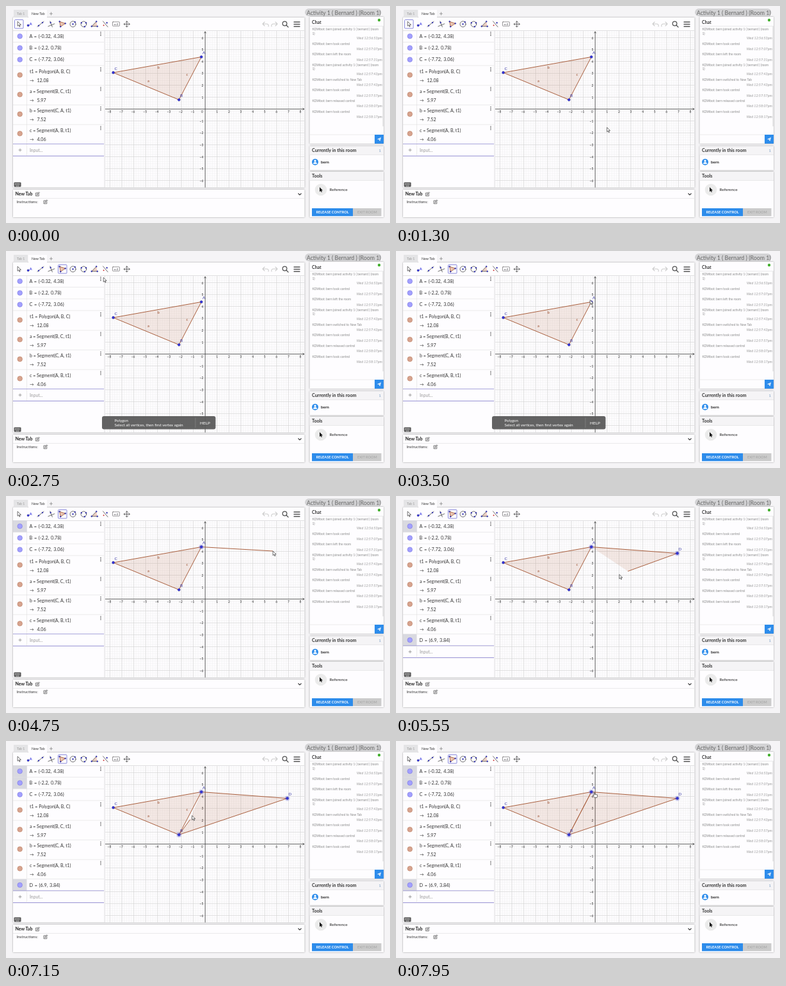
An HTML page for the animation above (8000 ms loop, 600 by 339 pixels).

```html
<!DOCTYPE html>
<html lang="en">
<head>
<meta charset="utf-8">
<title>Geometry room</title>
<style>
html, body { margin: 0; width: 100%; height: 100%; overflow: hidden; background: #f5f4f6; }
svg { display: block; width: 600px; height: 339px; font-family: Lato, "Open Sans", sans-serif; }
.card { fill: #fefdff; filter: drop-shadow(0 .7px .9px rgba(0,0,0,.4)); }
.head { fill: #f5f4f6; }
.rule { stroke: #ddd; stroke-width: .6; fill: none; }
.edge { stroke: #a95f3e; stroke-width: 1; fill: none; stroke-linejoin: round; }
.area { fill: #993300; fill-opacity: .1; }
.ink { stroke: #333; stroke-width: .7; fill: none; stroke-linecap: round; stroke-linejoin: round; }
.dot { fill: #3333e0; stroke: #22226a; stroke-width: .4; }
.halo { fill: #6666dd; fill-opacity: .35; }
.cell { fill: #d9d9e0; }
.b { font-weight: 700; }
.mid { text-anchor: middle; }
.end { text-anchor: end; }
.it { font-style: italic; }
.math { word-spacing: .8px; }
</style>
</head>
<body>
<svg viewBox="0 0 600 339">
  <defs>
    <clipPath id="view"><rect x="155" y="39" width="311.500" height="244.500"/></clipPath>
    <g id="edit" class="ink" style="stroke:#444">
      <path d="M1 -2H-2.500V2.800H2.300V0M-.6 1L-.3 -.4L2.500 -3.200L3.400 -2.300L.7 .5Z"/>
    </g>
  </defs>

  <!-- workspace -->
  <rect class="card" x="11" y="18" width="455.500" height="265.500"/>
  <rect x="12" y="6" width="22" height="12" fill="#e4e4e6"/>
  <rect x="35" y="6" width="29" height="12.500" fill="#fefdff"/>
  <path d="M68 12h5M70.500 9.500v5" stroke="#888" stroke-width=".8"/>
  <path class="rule" d="M11 38.500H466M154 38.500V283.500" style="stroke:#ccc"/>
  <rect id="picked" x="13.500" y="21.500" width="13.500" height="13.500" rx="1" fill="none" stroke="#7d7dd8" stroke-width=".9"/>
  <rect id="hover" x="81.500" y="21.500" width="13.500" height="13.500" rx="1" fill="#8888cc" fill-opacity=".18" stroke="#8c8cd8" stroke-width=".7"/>
  <g id="tools"></g>
  <g class="ink" style="stroke:#ccc;stroke-width:1.100">
    <path d="M404 25L401 28L404 31M401 28H407Q411 28 410 32"/>
    <path d="M421 25L424 28L421 31M424 28H418Q414 28 415 32"/>
  </g>
  <g class="ink" style="stroke:#555;stroke-width:1.300">
    <circle cx="435.500" cy="27.500" r="3.300"/>
    <path d="M438 30L441 33M450 25H459M450 28.500H459M450 32H459"/>
  </g>

  <g id="algebra"></g>
  <g id="inputRow">
    <path d="M11 215.500H153" stroke="#9a95d8" stroke-width=".8"/>
    <path d="M11 234.300H153" stroke="#8a83cf" stroke-width=".9"/>
    <path class="rule" d="M32.500 216V234"/>
    <path d="M19.500 225H24.500M22 222.500V227.500" stroke="#888" stroke-width=".8"/>
    <text x="37" y="227.800" font-size="6.800" fill="#999">Input...</text>
  </g>
  <g>
    <rect x="12.500" y="275.500" width="11" height="7" rx="1" fill="#555"/>
    <path d="M14 277.500H22M14 279.300H22M16 281.200H20" stroke="#fff" stroke-width=".8" stroke-dasharray="1 .6"/>
  </g>

  <!-- plot -->
  <g clip-path="url(#view)">
    <g id="grid"></g>
    <path class="edge" id="t1" style="fill:#930;fill-opacity:.1"/>
    <path id="fill" class="area"/>
    <path id="trace" class="edge"/>
    <g id="points"></g>
  </g>

  <g id="tip">
    <rect x="150" y="258" width="177.500" height="20.500" rx="3" fill="#5a5a5a" fill-opacity=".94"/>
    <path d="M296 260.500V276" stroke="#888" stroke-width=".7"/>
    <g fill="#fff" font-size="6.100">
      <text x="169.500" y="266.800">Polygon</text>
      <text x="169.500" y="274.300">Select all vertices, then first vertex again</text>
      <text x="303" y="271" font-size="6.500">HELP</text>
    </g>
  </g>

  <!-- instructions -->
  <rect class="card" x="11" y="287" width="455.500" height="43"/>
  <path class="rule" d="M11 300.500H466"/>
  <use href="#edit" x="49" y="294"/>
  <use href="#edit" x="61.500" y="306"/>
  <path class="ink" d="M456.800 293L459 295.200L461.200 293" style="stroke-width:1.100"/>

  <!-- sidebar -->
  <rect x="467" y="4" width="119.500" height="12" rx="6" fill="#d3d3d5"/>
  <rect class="card" x="474.500" y="17" width="115.500" height="198"/>
  <rect class="card" x="474.500" y="219" width="115.500" height="37.500"/>
  <rect class="card" x="474.500" y="259" width="115.500" height="71"/>
  <path class="head" d="M474.500 219H590V232.500H474.500ZM474.500 259H590V272.500H474.500Z"/>
  <path class="rule" d="M474.500 31.500H590M474.500 201H576M474.500 232.500H590M474.500 272.500H590"/>
  <rect x="588.300" y="32" width="1.400" height="156" fill="#e0e0e2"/>
  <circle cx="583" cy="22" r="2.200" fill="#43b02e"/>
  <rect x="576" y="201" width="14" height="14" fill="#2d8ceb"/>
  <path d="M580 208L586 205.300L584.300 211.200L582.800 209.200L585 206.600L582 208.800Z" fill="#fff"/>
  <circle cx="483" cy="243.700" r="5" fill="#2d8ceb"/>
  <path d="M480 246.800Q480 244 483 244T486 246.800Z" fill="#fff"/>
  <circle cx="483" cy="242" r="1.700" fill="#fff"/>
  <circle cx="492" cy="287" r="9.300" fill="#ebebeb"/>
  <path d="M490 283V290.200L491.700 288.700L492.800 291.100L493.900 290.600L492.800 288.200H495Z" fill="#111"/>
  <rect x="478" y="316" width="64" height="12.300" fill="#2d8ceb"/>
  <rect x="542" y="316" width="44.500" height="12.300" fill="#cbcbcb"/>
  <g id="labels"></g>

  <g id="cursor" fill="#fff" stroke="#333" stroke-width=".7" stroke-linejoin="round">
    <path id="arrow" d="M0 0V6.800L1.700 5.300L2.800 7.900L3.900 7.400L2.800 4.900H5Z"/>
    <path id="hand" d="M-.7 .4Q0 -.6 .7 .4V3L2 2.800L3.300 3.100L4.600 3.500Q5 6 3.900 8H.2Q-1 6 -2.400 4.400Q-2 3.300 -.7 4.600Z"/>
  </g>
</svg>
<script>
const LOOP = 8000, UNIT = 18.6, OX = 311.2, OY = 161;
const $ = id => document.getElementById(id);
const add = (id, html) => $(id).insertAdjacentHTML('beforeend', html);
const text = (x, y, s, size, fill = '#333', cls = '') =>
  `<text x="${x}" y="${y}" font-size="${size}" fill="${fill}" class="${cls}">${s}</text>`;
const plot = (x, y) => [OX + x * UNIT, OY - y * UNIT];
const path = (...pts) => 'M' + pts.map(p => p.join(' ')).join('L');

const A = plot(-0.32, 4.38), B = plot(-2.2, 0.78), C = plot(-7.72, 3.06), D = plot(6.9, 3.84);

// Toolbar icons, each centred on its own origin
const dots = (...pts) => pts.map(([x, y]) => `<circle class="dot" cx="${x}" cy="${y}" r="1"/>`).join('');
const ink = d => `<path class="ink" d="${d}"/>`;
const icons = [
  ink('M-2.2 -3.8V3L-.5 1.5L.8 4.2L1.8 3.7L.6 1.1H2.8Z'),
  '<circle class="dot" cx="-2.5" cy="2" r="1.6"/>' + text(-.5, 1.3, 'A', 5.5, '#3333e0', 'b'),
  ink('M-5 4L5 -4') + dots([-3, 2.4], [3, -2.4]),
  ink('M-5 3.5L5 -.5M-2 -4.500L1.500 4.500') + dots([-1.2, -2.4]),
  '<path d="M-4 -4L5 -1L-2.5 4Z" fill="#e9c4b3" stroke="#a0522d" stroke-width=".8"/>' + dots([-4, -4], [5, -1], [-2.5, 4]),
  '<circle class="ink" r="4.5"/>' + dots([0, 0], [3.2, -3.2]),
  '<circle class="ink" r="4.3"/>' + dots([-3.6, -2], [3.6, -2], [1.5, 4]),
  '<path d="M3 -4L-4.500 3.500H4.500" fill="#eecfc4"/>' + ink('M3 -4L-4.500 3.500H4.500') + dots([3, -4], [-4.5, 3.5], [4.5, 3.5]),
  ink('M-3.500 -4.500L4 4.500') + '<circle cx="-2.500" cy="2" r="1" fill="#c33"/>' + dots([2.5, -2]),
  '<rect class="ink" x="-5.500" y="-3.500" width="11" height="6.500" rx=".8" style="stroke-width:.5"/>' + text(0, 1.2, 'a=2', 4.2, '#333', 'mid'),
  ink('M-4.500 0H4.500M0 -4.500V4.500M-3 -1.500L-4.500 0L-3 1.500M3 -1.500L4.500 0L3 1.500M-1.500 -3L0 -4.500L1.500 -3M-1.500 3L0 4.500L1.500 3')
];
add('tools', icons.map((s, i) => `<g transform="translate(${20.3 + i * 16.85} 28.3)">${s}</g>`).join(''));

// Algebra list
const marble = (y, brown) => `<circle cx="21.700" cy="${y}" r="3.800" fill="${brown ? '#d7a48f' : '#a3a0ff'}" stroke="${brown ? '#b97c62' : '#7a76dd'}" stroke-width=".6"/>`;
const menu = y => [-2.4, 0, 2.4].map(d => `<circle cx="148" cy="${y + d}" r=".8" fill="#555"/>`).join('');
const pointRow = (id, y, s) => `<g id="row${id}"><rect class="cell" id="cell${id}" x="11" y="${y - 9}" width="21.500" height="18.200"/>
  ${marble(y)}${text(36.5, y + 2.6, s, 7.3, '#333', 'math')}<path class="rule" d="M11 ${y + 9.3}H153"/></g>`;
const shapeRow = (y, s, value) => marble(y + 5.9, true) + text(37, y + 3.4, s, 7) +
  text(37, y + 17.4, '→', 6.5) + text(48.5, y + 17.4, value, 7.1) + menu(y - 2.8) +
  `<path class="rule" d="M11 ${y + 22.2}H153"/>`;
add('algebra', '<path class="rule" d="M32.500 39V215"/>' +
  pointRow('A', 47.2, 'A = (-0.32, 4.38)') + menu(43.5) +
  pointRow('B', 65.5, 'B = (-2.2, 0.78)') +
  pointRow('C', 83.7, 'C = (-7.72, 3.06)') +
  shapeRow(101.8, 't1 = Polygon(A, B, C)', '12.08') +
  shapeRow(132.4, 'a = Segment(B, C, t1)', '5.97') +
  shapeRow(163, 'b = Segment(C, A, t1)', '7.52') +
  shapeRow(193.4, 'c = Segment(A, B, t1)', '4.06') +
  pointRow('D', 225, 'D = (6.9, 3.84)'));

// Grid, axes and tick labels
const mesh = (step, reach) => {
  let d = '';
  for (let k = -reach; k <= reach; k++) {
    const o = k * step * UNIT;
    d += `M${OX + o} 39V284M155 ${OY + o}H467`;
  }
  return d;
};
let ticks = text(306.5, 166.8, '0', 5, '#333', 'mid');
for (let n = -8; n <= 8; n++) {
  if (!n) continue;
  const s = String(n).replace('-', '−');
  ticks += text(OX + n * UNIT - (n < 0 ? 1 : 0), 166.8, s, 5, '#333', 'mid');
  if (Math.abs(n) < 7) ticks += text(308.4, OY - n * UNIT + 2.1, s, 5, '#333', 'end');
}
add('grid', `<path d="${mesh(.2, 44)}" stroke="#efefef" stroke-width=".5"/>
  <path d="${mesh(1, 9)}" stroke="#d2d2d2" stroke-width=".6"/>
  <path d="M155 ${OY}H466M${OX} 284V40M463.500 ${OY - 1.5}L466 ${OY}L463.500 ${OY + 1.5}M${OX - 1.5} 42.500L${OX} 40L${OX + 1.5} 42.500" stroke="#333" stroke-width=".7" fill="none"/>` + ticks);

const point = (id, [x, y]) => `<g id="pt${id}"><circle class="halo" id="halo${id}" cx="${x}" cy="${y}" r="3.900"/>
  <circle class="dot" cx="${x}" cy="${y}" r="2"/>${text(x + 1.8, y - 4.3, id, 6.5, '#3c3ca8')}</g>`;
add('points', point('A', A) + point('B', B) + point('C', C) + point('D', D) +
  text(221, 119.2, 'a', 6, '#994a2a') + text(236.5, 97.8, 'b', 6, '#994a2a') + text(281.5, 109.2, 'c', 6, '#994a2a'));
$('t1').setAttribute('d', path(A, B, C) + 'Z');

// Panel labels and chat
const joined = 'bern joined activity 1 ( bernard ) (room';
const chat = [
  [38.2, joined, '56:53'], [61, 'bern took control', '57:07'], [77.3, 'bern left the room', '57:31'],
  [94, joined, '57:43'], [116.7, 'bern switched to New Tab', '57:43'], [133.4, 'bern took control', '57:57'],
  [149.8, 'bern released control', '58:07'], [166.5, 'bern took control', '58:17']
];
add('labels', text(17, 14.4, 'Tab 1', 5.2, '#999') + text(40, 14.4, 'New Tab', 5.4) +
  text(14.5, 296.2, 'New Tab', 7, '#222', 'b') + text(16.5, 308.2, 'Instructions:', 6.1) +
  text(469.8, 13.6, 'Activity 1 ( Bernard ) (Room 1)', 8.8, '#666') +
  text(478, 27.6, 'Chat', 7, '#333', 'b') +
  text(478, 228.3, 'Currently in this room', 7.2, '#333', 'b') + text(586, 228.3, '1', 6.5, '#7fa3c8', 'end') +
  text(492, 246, 'bern', 6.3, '#222', 'b') + text(478, 268.2, 'Tools', 7.1, '#333', 'b') +
  text(505.5, 289.3, 'Reference', 6.4, '#222') +
  text(510, 324.2, 'RELEASE CONTROL', 5.6, '#fff', 'mid b') + text(564.3, 324.2, 'EXIT ROOM', 5.6, '#a2a2a2', 'mid') +
  chat.map(([y, s, time]) => {
    const wraps = s === joined;
    return text(478.4, y, 'KDWbot: ' + s, 4.9, '#888') + (wraps ? text(478.4, y + 6.4, '1)', 4.9, '#888') : '') +
      text(587.8, y + (wraps ? 14.2 : 8.2), `Wed 12:${time}pm`, 5.4, '#999', 'end it');
  }).join(''));

// Pointer stops: time, x, y
const stops = [
  [750, 512, 318], [1300, 330, 190], [1950, 89, 27], [2500, 89, 27], [3350, 303, 76], [4250, 304, 79],
  [4650, 417, 86], [4750, 417, 86], [5000, 439, 89], [5150, 439, 89], [5550, 349, 122.5],
  [6100, 275, 148], [6850, 275, 148], [7500, 309, 80], [7800, 309, 80], [7950, 310, 80.5]
];
function pointer(t) {
  const i = stops.findIndex(s => s[0] > t);
  if (i < 0) return stops[stops.length - 1].slice(1);
  if (!i) return stops[0].slice(1);
  const [t0, x0, y0] = stops[i - 1], [t1, x1, y1] = stops[i];
  const u = (t - t0) / (t1 - t0);
  return [x0 + (x1 - x0) * u, y0 + (y1 - y0) * u];
}

const CLICK = { tool: 2250, A: 4200, D: 5100, B: 6800 };
const LAG = 60;
const show = (id, on) => { $(id).style.display = on ? '' : 'none'; };
const within = (t, a, b) => t >= a && t < b;
const snap = p => [A, B, D].find(q => Math.hypot(p[0] - q[0], p[1] - q[1]) < 7) || p;

function draw(t) {
  const polygon = t >= CLICK.tool, hasD = t >= CLICK.D, hasB = t >= CLICK.B;
  $('picked').setAttribute('x', polygon ? 81.5 : 13.5);
  show('hover', within(t, 1900, 2600));
  show('tip', within(t, 2300, 4500));
  $('tip').style.opacity = Math.min(1, (t - 2300) / 100, (4500 - t) / 100);

  for (const id of ['A', 'B', 'D']) {
    show('cell' + id, t >= CLICK[id]);
    show('halo' + id, t >= CLICK[id]);
  }
  show('cellC', false);
  show('haloC', false);
  show('rowD', hasD);
  show('ptD', hasD);
  $('inputRow').setAttribute('transform', `translate(0 ${hasD ? 18.3 : 0})`);

  const tip = snap(pointer(t - LAG));
  const chain = [A, ...(hasD ? [D] : []), ...(hasB ? [B] : []), tip];
  show('trace', t >= CLICK.A);
  show('fill', hasD);
  $('trace').setAttribute('d', path(...chain));
  $('fill').setAttribute('d', path(...chain) + 'Z');

  const [x, y] = pointer(t);
  const hand = within(t, 750, 900) || within(t, 1880, 2580) || within(t, 3600, 4300) ||
    within(t, 5000, 5200) || within(t, 6050, 6900) || t >= 7450;
  show('cursor', t >= 750);
  show('hand', hand);
  show('arrow', !hand);
  $('cursor').setAttribute('transform', `translate(${x} ${y})`);
}

const start = performance.now();
function tick() {
  draw((performance.now() - start) % LOOP);
  requestAnimationFrame(tick);
}
tick();
</script>
</body>
</html>
```
